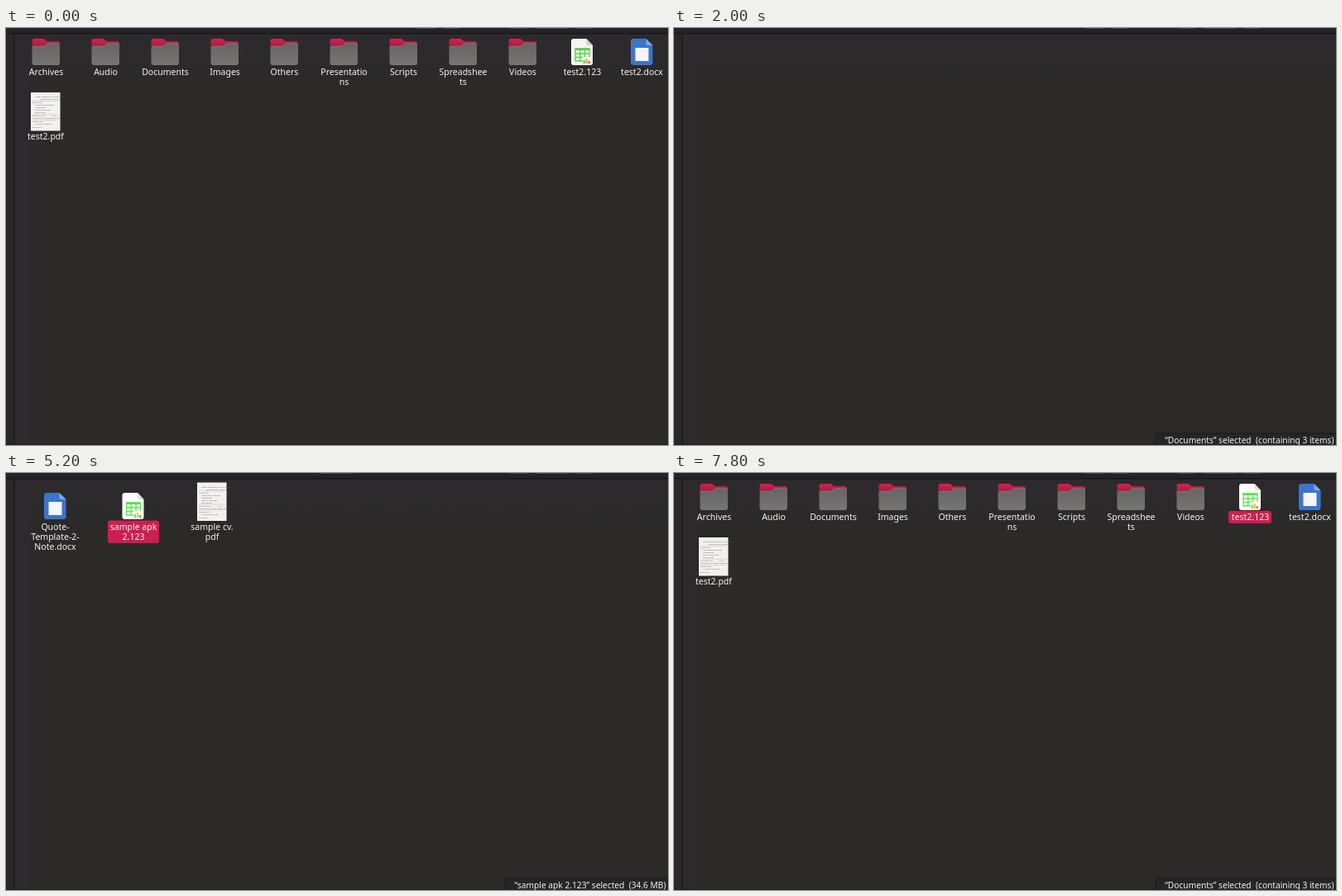
An HTML page that plays this animation: 800x505 px, repeating every 8 s.

```html
<!DOCTYPE html>
<html lang="en">
<head>
<meta charset="utf-8">
<title>File manager</title>
<style>
html, body { margin: 0; width: 100%; height: 100%; overflow: hidden; background: #2b2a29; }
svg { display: block; width: 100vw; height: 100vh; }
text { font-family: "Noto Sans", "Open Sans", sans-serif; fill: #f4f3f2; white-space: pre; }
.label { font-size: 10.5px; text-anchor: middle; }
.status { font-size: 10.2px; text-anchor: end; }
.pill { fill: #cb1f50; }
.tiny { font-size: 2.3px; fill: #55524f; }
.hover { filter: brightness(1.08); }
</style>
</head>
<body>
<svg viewBox="0 0 800 505">
  <defs>
    <linearGradient id="tint" x2="0" y2="1">
      <stop stop-color="#2d2a2e"/><stop offset="1" stop-color="#2d2a2e" stop-opacity="0"/>
    </linearGradient>
    <linearGradient id="front" x2="0" y2="1">
      <stop stop-color="#666564"/><stop offset="1" stop-color="#767573"/>
    </linearGradient>
    <linearGradient id="back" x2="0" y2="1">
      <stop stop-color="#d3224f"/><stop offset="1" stop-color="#8f1a3c"/>
    </linearGradient>

    <!-- icons are centred on x = 0 and start at y = 0 -->
    <g id="folder">
      <path fill="url(#back)" d="M-17 3q0-3 3-3h10q1.500 0 2.500 1l1 1q1 1 2.500 1H13.500q3 0 3 3V14H-17z"/>
      <path fill="url(#front)" d="M-17 11.500q0-2.500 2.500-2.500H-4q2 0 3.300-1.500l.7-.8Q1 5.500 3 5.500H14q2.500 0 2.500 2.500V29q0 3-3 3H-14q-3 0-3-3z"/>
      <path fill="none" stroke="#8b8987" stroke-width=".6" d="M-16.500 10.500q.5-1.300 2-1.300H-4q2 0 3.300-1.500l.7-.8Q1 5.800 3 5.800H14q1.600 0 2 1.200"/>
    </g>
    <g id="sheet">
      <path fill="#f5f5f3" d="M-13.500 3q0-3 3-3H5L12.500 8V29q0 3-3 3H-10.500q-3 0-3-3z"/>
      <path fill="#cfcfcc" d="M5 0L12.500 8H7q-2 0-2-2z"/>
      <path fill="#e4f6df" d="M-9 11.500H9V27H-9z"/>
      <path fill="#55cb4d" d="M-9 11.500H9V14H-9z"/>
      <path fill="none" stroke="#5bcf52" stroke-width="1.300" d="M-8.500 12H8.500V27H-8.500zM-8.500 18H8.500M-8.500 22.500H8.500M-2.800 12V27M3 12V27"/>
      <path fill="#f5f5f3" d="M0 22H10.500V31H0z"/>
      <path fill="#69c95f" d="M1 26H3.300V30H1z"/>
      <path fill="#e8b63b" d="M4 24H6.300V30H4z"/>
      <path fill="#d9674d" d="M7 27H9.300V30H7z"/>
    </g>
    <g id="doc">
      <path fill="#3c75c9" d="M-13.500 3q0-3 3-3H5L13 8V29q0 3-3 3H-10.500q-3 0-3-3z"/>
      <path fill="#7fa9e4" d="M5 0L13 8H7q-2 0-2-2z"/>
      <path fill="#f3f5f8" d="M-8 11H8V27H-8z"/>
    </g>
    <g id="paper"><path fill="#f3f1ef" d="M-18 0H17.500V46.500H-18z"/></g>
  </defs>

  <path fill="#2b2a29" d="M0 0H800V505H0z"/>
  <path fill="url(#tint)" d="M10 8H800V60H10z"/>
  <path fill="#2c2a2c" d="M10 8H29V505H10z"/>
  <path fill="#292729" d="M0 8H9V505H0z"/>
  <path fill="#1a181b" d="M9 8H10.500V505H9z"/>
  <path fill="#252327" d="M0 0H800V6H0z"/>
  <path fill="#19171b" d="M0 6H800V7.500H0z"/>
  <path fill="#201f1f" d="M0 504H800V505H0z"/>
  <path fill="#48464a" d="M609 0h21v1h-21zM640 0h40v1h-40zM688 0h21v1h-21z"/>
  <path id="homeTabs" fill="#48464a" d="M496 0h24v1h-24zM528 0h21v1h-21z"/>
  <path id="subTabs" fill="#48464a" d="M379 0h41v1h-41z"/>
  <g id="home"></g>
  <g id="sub"></g>
  <g id="docStatus"></g>
  <g id="apkStatus"></g>
</svg>
<script>
const LOOP = 8000;
const $ = id => document.getElementById(id);

function add(parent, tag, attrs, text = "") {
  const el = document.createElementNS("http://www.w3.org/2000/svg", tag);
  for (const key in attrs) el.setAttribute(key, attrs[key]);
  el.textContent = text;
  parent.append(el);
  return el;
}

// Fine print of the page thumbnail: [x, y, text]
[
  [-13, 6, "SHORT SUMMARY OF THE SAMPLE"], [-7, 9, "sample page, one of two"],
  [-16, 13, "FIRST PART"], [-13, 16, "some short lines here"],
  [-13, 19, "a few words"], [-13, 22, "more of the same"], [-13, 25, "and the rest"],
  [-16, 29, "SECOND PART             2 of 3"], [-16, 32, "a longer line of plain words here"],
  [-16, 36, "THIRD PART"], [-13, 39, "a last line of words"], [-16, 43, "END PART"]
].forEach(([x, y, words]) => add($("paper"), "text", { class: "tiny", x, y }, words));
add($("paper"), "path", { d: "M-16 10.500H15M-16 26.500H15M-16 33.500H15", stroke: "#bdb9b5", "stroke-width": .5 });

function item(parent, icon, x, top, base, lines, pillBox) {
  const image = add(parent, "use", { href: "#" + icon, x, y: top });
  const pill = pillBox && add(parent, "rect", {
    class: "pill", x: pillBox[0], y: pillBox[1], width: pillBox[2], height: pillBox[3], rx: 3
  });
  lines.split("|").forEach((line, i) =>
    add(parent, "text", { class: "label", x, y: base + 12.2 * i }, line));
  return { image, pill };
}

const pills = { 2: [162, 46, 61, 15], 9: [670, 46, 52, 15] };
const home = ["Archives", "Audio", "Documents", "Images", "Others", "Presentatio|ns", "Scripts",
  "Spreadshee|ets".replace("ee|", "e|e").replace("e|eets", "ee|ts"), "Videos", "test2.123", "test2.docx"]
  .map((name, i) => item($("home"), ["sheet", "doc"][i - 9] || "folder",
    48.5 + 72 * i, 13, 57, name, pills[i]));
item($("home"), "paper", 48, 78, 135, "test2.pdf");

item($("sub"), "doc", 59.5, 24, 68.5, "Quote-|Template-2-|Note.docx");
const apk = item($("sub"), "sheet", 154, 24, 68.5, "sample apk|2.123", [123, 57.5, 62, 27.5]);
item($("sub"), "paper", 249, 11.500, 68.5, "sample cv.|pdf");

function status(parent, x, words) {
  add(parent, "path", { d: `M${x}.500 506V494q0-3 3-3H801V506z`, fill: "#262527", stroke: "#19181a" });
  add(parent, "text", { class: "status", x: 797.5, y: 503 }, words);
}
status($("docStatus"), 582, "“Documents” selected  (containing 3 items)");
status($("apkStatus"), 603, "“sample apk 2.123” selected  (34.6 MB)");

const show = (el, on) => el.style.display = on ? "" : "none";

// Hovered item of the home folder: [index, from, to]
const hovers = [[2, 1200, 2000], [5, 6200, 6400], [6, 6400, 6600], [7, 6600, 6800], [8, 6800, 7000], [9, 7000, 8000]];

function draw(now) {
  const t = now % LOOP;
  const during = (from, to) => t >= from && t < to;
  const inSub = during(2200, 5600);
  show($("home"), t < 2000 || t >= 5800);
  show($("sub"), inSub);
  show($("subTabs"), inSub);
  show($("homeTabs"), !inSub);
  show(home[2].pill, during(1800, 2000) || during(5800, 7800));
  show(home[9].pill, t >= 7800);
  show(apk.pill, t >= 3800);
  show($("docStatus"), during(1800, 2200) || t >= 6000);
  show($("apkStatus"), during(4000, 5600));
  home.forEach(({ image }, i) =>
    image.classList.toggle("hover", hovers.some(([n, from, to]) => n === i && during(from, to))));
  apk.image.classList.toggle("hover", t >= 3800);
}

const start = performance.now();
function tick() {
  draw(performance.now() - start);
  requestAnimationFrame(tick);
}
tick();
</script>
</body>
</html>
```
